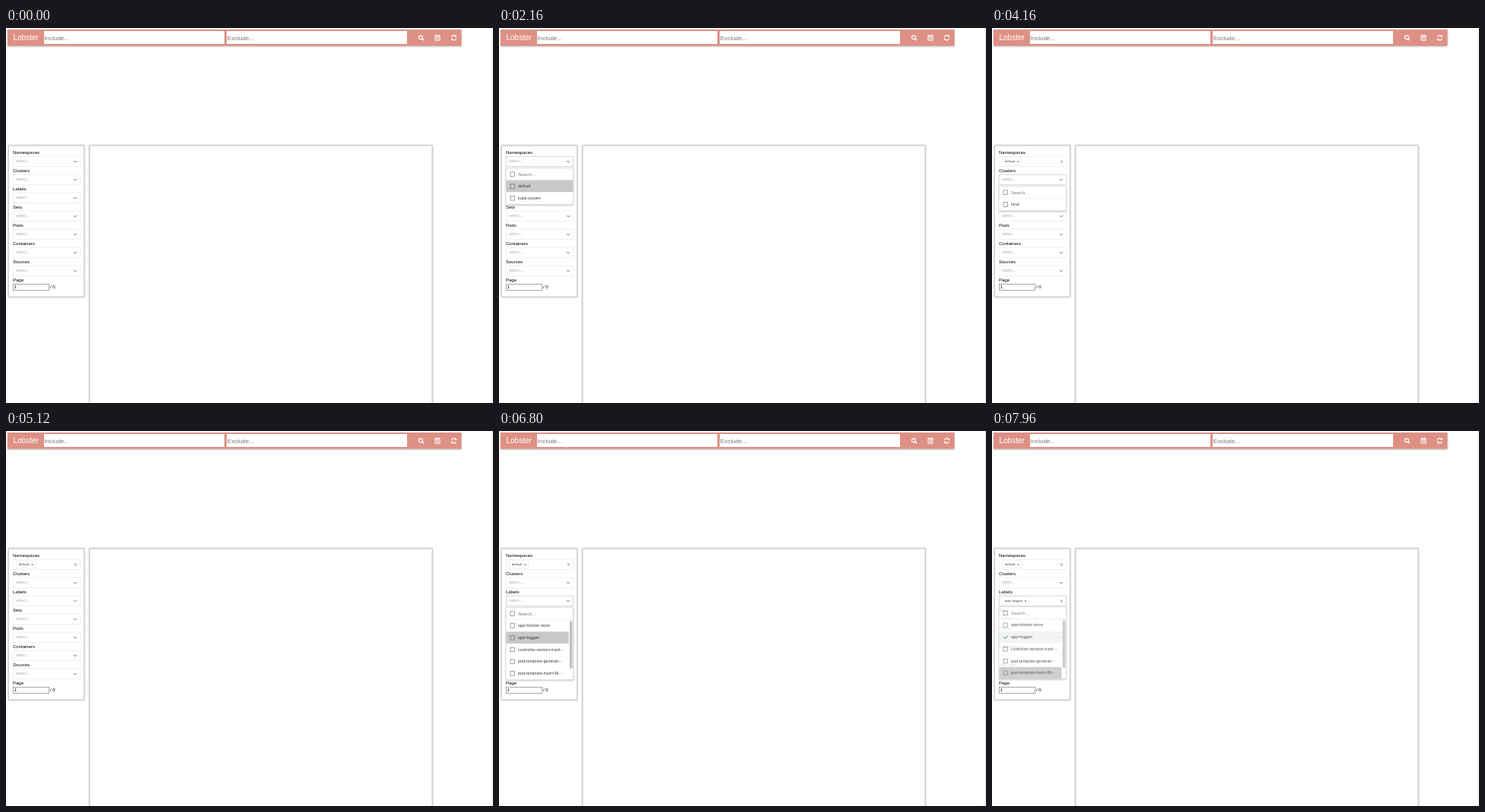
Recreate the animation shown at these times as an HTML page. Size 640x494 px, loop 8 s.

```html
<!DOCTYPE html>
<html lang="en">
<head>
<meta charset="utf-8">
<title>Lobster</title>
<style>
  html, body { margin: 0; width: 100%; height: 100%; overflow: hidden; background: #fff; }
  svg { display: block; width: 640px; height: 494px; }
  text { font-family: "Liberation Sans", Arial, sans-serif; font-size: 6px; white-space: pre; }
  .small { font-family: "Noto Sans", sans-serif; font-size: 5px; fill: #333; }
  .tag { font-size: 4.2px; }
  .hint { fill: #a8a8a8; }
  .search { font-size: 5.8px; fill: #757575; }
  .bar { font-size: 8px; fill: #757575; }
  .panel { fill: #fff; stroke: #ccc; filter: drop-shadow(0 0 1px #aaa); }
  .menu { fill: #fff; stroke: #d2d2d2; stroke-width: .6; filter: drop-shadow(0 1px 1px #bbb); }
  .line { fill: none; stroke: #555; stroke-width: .8; }
  .icon { fill: none; stroke: #fff; stroke-width: 1.2; }
</style>
</head>
<body>
<svg viewBox="0 0 640 494">
  <path d="M639.5 0V490Q639.5 493.5 636 493.5" fill="none" stroke="#e4e4e4"/>
  <rect x="2" y="2" width="596.5" height="21.5" fill="#de9084" style="filter:drop-shadow(0 1px 1px #bbb)"/>
  <text x="9.5" y="16" style="font-size:10px;fill:#fff">Lobster</text>
  <path d="M50 4H287V21H50ZM290 4H527V21H290Z" fill="#fff"/>
  <text class="bar" x="50.5" y="15.5">Include...</text>
  <text class="bar" x="290.8" y="15.5">Exclude...</text>
  <g class="icon">
    <circle cx="545" cy="12.3" r="2.5"/>
    <path d="M546.9 14.2L549 16.3" stroke-width="1.5"/>
    <path d="M563.8 10.3H570.2V16.4H563.8Z" stroke-width=".8"/>
    <path d="M563.5 10.4H570.5M565.3 8.8V10.5M568.7 8.8V10.5"/>
    <path d="M564 12.4H570M564 14.4H570M566 11V16.5M568 11V16.5" stroke-width=".5"/>
    <path d="M585.4 12A3.2 3.2 0 0 1 591 10.8M591.6 13.8A3.2 3.2 0 0 1 586 15"/>
    <path d="M592 9V12H589ZM585 16.8V13.8H588Z" fill="#fff" stroke="none"/>
  </g>
  <rect class="panel" x="3.5" y="155" width="99" height="199"/>
  <rect class="panel" x="110" y="155" width="450" height="345"/>
  <text x="9" y="334">Page</text>
  <rect x="9.4" y="337.4" width="47" height="8" fill="#fff" stroke="#808080" stroke-width=".7"/>
  <text x="10.8" y="343.4">1</text>
  <text x="58" y="343.3">/ 0</text>
  <g id="form"></g>
</svg>
<script>
const LOOP = 8000, OPENING = 760, PITCH = 15.75;
const fields = ['Namespaces', 'Clusters', 'Labels', 'Sets', 'Pods', 'Containers', 'Sources']
  .map((name, i) => ({ name, y: 175.8 + 24 * i }));

// hover: [time, row] pairs; the last row reached stays highlighted
Object.assign(fields[0], {
  open: 1120, close: 2800, gone: 2960, rows: ['default', 'kube-system'],
  hover: [[2040, 0], [2680, 1]], picked: 0, pickedAt: 2520
});
Object.assign(fields[1], {
  open: 3240, close: 5000, gone: 5120, rows: ['local'], hover: []
});
Object.assign(fields[2], {
  open: 5520, close: 7840, gone: 8000,
  rows: ['app=lobster-store', 'app=loggen', 'controller-revision-hash⋯',
    'pod-template-generati⋯', 'pod-template-hash=56⋯'],
  hover: [[6560, 0], [6680, 1], [7320, 2], [7400, 3], [7480, 4]], picked: 1, pickedAt: 7240
});

const text = (x, y, s, cls = '') => `<text class="${cls}" x="${x}" y="${y}">${s}</text>`;
const rect = (x, y, w, h, attrs) =>
  `<rect x="${x}" y="${y}" width="${w}" height="${h}" ${attrs}/>`;
const line = (d, attrs = '') => `<path class="line" d="${d}" ${attrs}/>`;
const cross = (x, y, r) =>
  line(`M${x - r} ${y - r}l${2 * r} ${2 * r}m0 ${-2 * r}l${-2 * r} ${2 * r}`, 'style="stroke-width:.6"');
const checkbox = y => rect(15, y - 2.8, 5.6, 5.6, 'fill="#fff" stroke="#666" stroke-width=".6"');

const isOpen = (f, t) => t >= f.open && t < f.gone;
const isPicked = (f, t) => t >= f.pickedAt;

function trigger(f, t) {
  const { y } = f;
  const border = isOpen(f, t) ? '#c4c4c4' : '#e8e8e8';
  let out = text(9, y - 9.8, f.name) +
    rect(9.2, y - 6.7, 88.3, 13.6, `fill="#fff" stroke="${border}" stroke-width=".7"`);
  if (isPicked(f, t)) {
    const label = f.rows[f.picked], end = label === 'default' ? 34.6 : 44;
    out += rect(13.5, y - 5, end - 9.5, 10, 'rx="1" fill="#fff" stroke="#e6e6e6" stroke-width=".6"') +
      text(16.8, y + 1.6, label, 'small tag') + cross(end, y + .3, 1.1) + cross(91.4, y + .2, 1.5);
  } else {
    out += text(13, y + 1.5, 'select...', 'small hint') + line(`M89 ${y - .9}l2 2l2 -2`);
  }
  return out;
}

function menu(f, t) {
  if (!isOpen(f, t)) return '';
  const left = (1 - Math.min(1, (t - f.open) / OPENING)) ** 2.3;
  const leaving = Math.max(0, (t - f.close) / 160);
  const shift = -13.5 * left - .9 * leaving;
  const opacity = 1 - .7 * left - .2 * leaving;
  const top = f.y + 8.7, search = f.y + 16.8, list = f.y + 24.8;
  const height = f.rows.length * PITCH, scrolls = f.rows.length > 4;
  const hovered = f.hover.filter(([at]) => t >= at).pop()?.[1];

  let out = rect(9.2, top, 88.3, list + height - top, 'class="menu"') +
    checkbox(search) + text(25, search + 1.9, 'Search...', 'search') +
    line(`M9.5 ${list - .4}H97.2`, 'style="stroke:#e2e2e2;stroke-width:.6"');
  f.rows.forEach((label, i) => {
    const y = list + i * PITCH, mid = y + PITCH / 2;
    const picked = i === f.picked && isPicked(f, t);
    const fill = i === hovered ? '#c8c8c8' : picked ? '#f2f2f2' : '#fff';
    out += rect(9.5, y, scrolls ? 82 : 87.7, PITCH, `fill="${fill}"`) +
      (picked ? line(`M15.3 ${mid}l1.9 2l3.6 -4`, 'style="stroke:#287a50;stroke-width:1"')
        : checkbox(mid).replace('#fff', fill)) +
      text(25, mid + 1.7, label, 'small');
  });
  if (scrolls) out += rect(92.8, list + 1.3, 3.6, 63, 'rx="1.5" fill="#c1c1c1"');
  return `<g transform="translate(0 ${shift})" opacity="${opacity}">${out}</g>`;
}

const form = document.getElementById('form');
let shown = '';
function draw(now) {
  const t = now % LOOP;
  const markup = fields.map(f => trigger(f, t)).join('') + fields.map(f => menu(f, t)).join('');
  if (markup !== shown) form.innerHTML = shown = markup;
  requestAnimationFrame(() => draw(performance.now() - start));
}
const start = performance.now();
draw(0);
</script>
</body>
</html>
```
